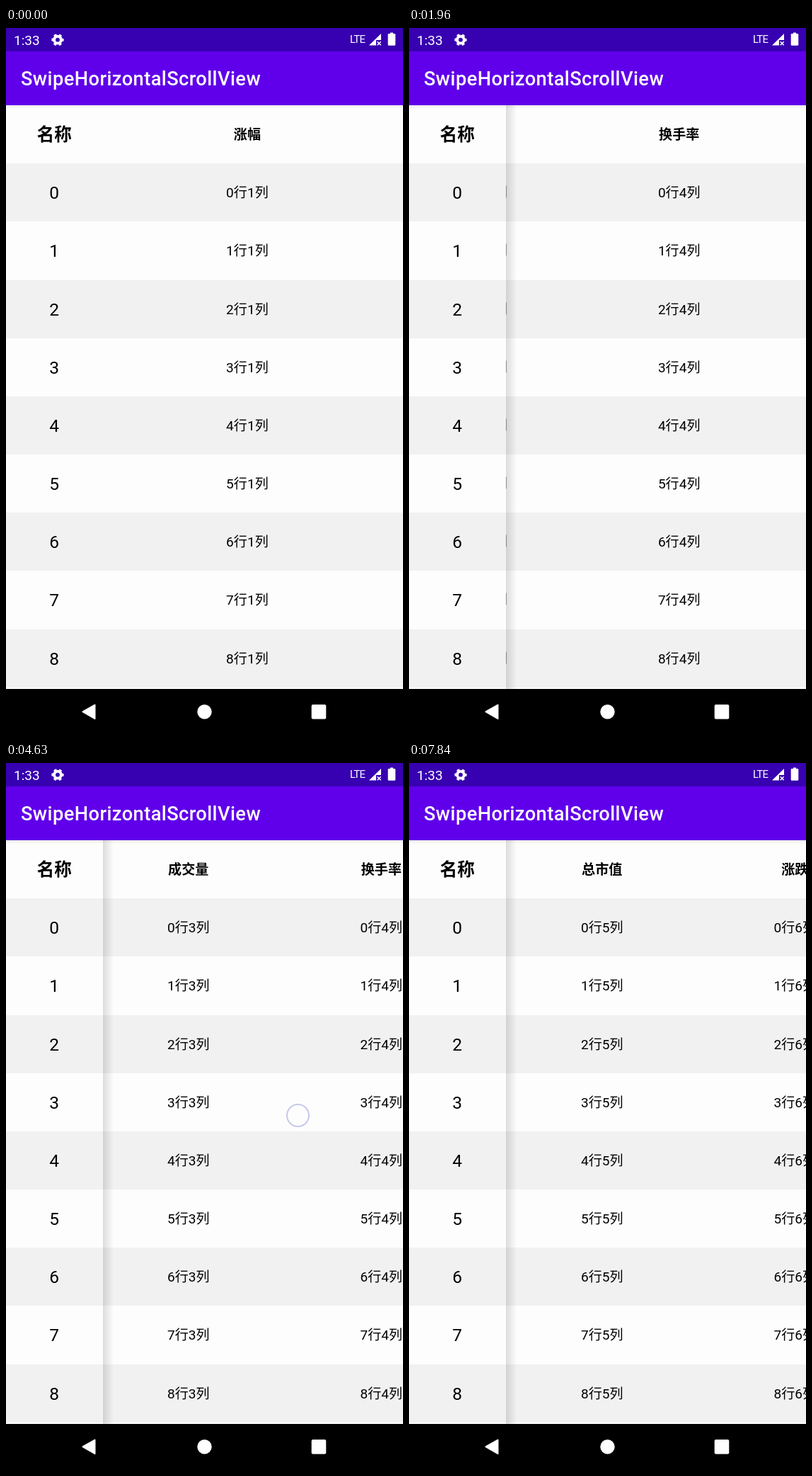
Write an HTML page that moves like this. It is 561x998 px and loops after 8.04 s.

```html
<!DOCTYPE html>
<html lang="zh-CN">
<head>
<meta charset="utf-8">
<title>SwipeHorizontalScrollView</title>
<style>
html, body { margin: 0; width: 100%; height: 100%; overflow: hidden; background: #fdfdfd; }
body { position: relative; font-family: Roboto, "Noto Sans CJK SC", "Noto Sans CJK", sans-serif; color: #000; }
div, svg { position: absolute; }
svg { left: 0; top: 0; }
#status { width: 561px; height: 33px; background: #3700b0; color: #fff; }
#bar { top: 33px; width: 561px; height: 76px; background: #6000ea; }
#title { left: 21px; top: 1px; line-height: 76px; font-size: 27.27px; font-weight: 500;
  letter-spacing: .4px; color: #fff; white-space: nowrap; }
#clock { left: 11px; line-height: 35px; font-size: 19.1px; }
#lte { left: 486px; line-height: 33px; font-size: 15px; letter-spacing: -.7px; }
#table { top: 109.2px; width: 561px; height: 823.4px; overflow: hidden; }
.row { width: 561px; height: 82.15px; }
#track, #names { left: 0; top: 0; }
#names { width: 136.5px; height: 100%; overflow: hidden; }
.cell { height: 82px; line-height: 84px; text-align: center; white-space: nowrap; }
#track .cell { width: 272.65px; font-size: 19.09px; }
#names .cell { width: 136.5px; font-size: 24.54px; }
.head { font-weight: 700; }
#shade { left: 136.5px; width: 15px; height: 100%;
  background: linear-gradient(90deg, rgba(0,0,0,.13), rgba(0,0,0,.08) 40%, transparent); }
#drop { width: 561px; height: 5px; background: linear-gradient(rgba(0,0,0,.07), transparent); }
#ring { width: 29px; height: 29px; border: 2px solid #c6c8ec; border-radius: 50%; }
#nav { top: 932.6px; width: 561px; height: 66px; background: #000; }
</style>
</head>
<body>
<div id="table">
  <div id="stripes"></div>
  <div id="track"></div>
  <div id="names"></div>
  <div id="shade"></div>
  <div id="drop"></div>
</div>
<div id="ring"></div>
<div id="status"><div id="clock">1:33</div><div id="lte">LTE</div></div>
<div id="bar"><div id="title">SwipeHorizontalScrollView</div></div>
<div id="nav"></div>
<svg width="561" height="998" fill="#fff">
  <g fill="none" stroke="#fff">
    <circle cx="73" cy="16.7" r="4.9" stroke-width="4"/>
    <circle cx="73" cy="16.7" r="7.2" stroke-width="2.8" stroke-dasharray="3.9 3.64" stroke-dashoffset="1.95"/>
  </g>
  <path d="M513 24.5 530 8V17H523V24.5Z"/>
  <path d="M524.7 19.2l5 5m0-5l-5 5" stroke="#fff" stroke-width="1.6"/>
  <path d="M543 8V6.6h4V8h2q1.3 0 1.3 1.3v14.2q0 1.3-1.3 1.3h-8q-1.3 0-1.3-1.3V9.3q0-1.3 1.3-1.3Z"/>
  <path d="M108.5 965.2 125.5 955.5V975Z" stroke="#fff" stroke-width="2" stroke-linejoin="round"/>
  <circle cx="280.5" cy="965.2" r="10.2"/>
  <rect x="431.7" y="955" width="20.6" height="20.6" rx="2"/>
</svg>
<script>
const LOOP = 8040, ROW = 82.15, COL = 272.65, INSET = 204.6;
const heads = ['涨幅', '现价', '成交量', '换手率', '总市值', '涨跌'];
const $ = id => document.getElementById(id);

function add(parent, cls, x, y, text = '') {
  const el = document.createElement('div');
  el.className = cls;
  el.style.left = x + 'px';
  el.style.top = y + 'px';
  el.textContent = text;
  $(parent).append(el);
  return el;
}

for (let r = 0; r < 10; r++) {
  const y = r * ROW, cls = r ? 'cell' : 'cell head';
  const fill = r % 2 ? '#f1f1f1' : '#fdfdfd';
  add('stripes', 'row', 0, y).style.background = fill;
  add('names', 'row', 0, y).style.background = fill;
  add('names', cls, 0, y, r ? r - 1 : '名称');
  heads.forEach((h, c) => add('track', cls, INSET + c * COL, y, r ? `${r - 1}行${c + 1}列` : h));
}

const speedUp = p => p * p;
const slowDown = p => 1 - (1 - p) ** 2;
const smooth = p => p * p * (3 - 2 * p);
const snap = k => INSET - 136.4 + k * COL;

// start, end, scroll offset reached, easing, finger x and y at the start of a drag
const moves = [
  [900, 1500, 360, speedUp, 480, 505],
  [1500, 2346, snap(3), slowDown],
  [2750, 3480, 690.8, smooth, 238, 496],
  [3500, 4340, snap(2), smooth],
  [4540, 4980, 749, smooth, 427.5, 497.5],
  [4980, 5420, snap(2), slowDown],
  [5650, 6050, 850, speedUp, 440, 500],
  [6050, 6840, snap(4), slowDown],
];
const FADE = 30;

function draw(now) {
  const t = now % LOOP;
  let scroll = 0, alpha = 0, fx = 0, fy = 0;
  for (const [from, to, goal, ease, x, y] of moves) {
    if (t < from) break;
    const start = scroll;
    scroll += (goal - start) * ease(Math.min(1, (t - from) / (to - from)));
    if (x && t < to + FADE) {
      alpha = Math.min(1, 1 - (t - to) / FADE);
      fx = x + start - scroll;
      fy = y;
    }
  }
  $('track').style.transform = `translateX(${-scroll}px)`;
  $('shade').style.opacity = Math.min(1, scroll / 20);
  $('ring').style.opacity = alpha;
  $('ring').style.transform = `translate(${fx - 16.5}px, ${fy - 16.5}px)`;
}

const begin = performance.now();
function tick() {
  draw(performance.now() - begin);
  requestAnimationFrame(tick);
}
tick();
</script>
</body>
</html>
```
